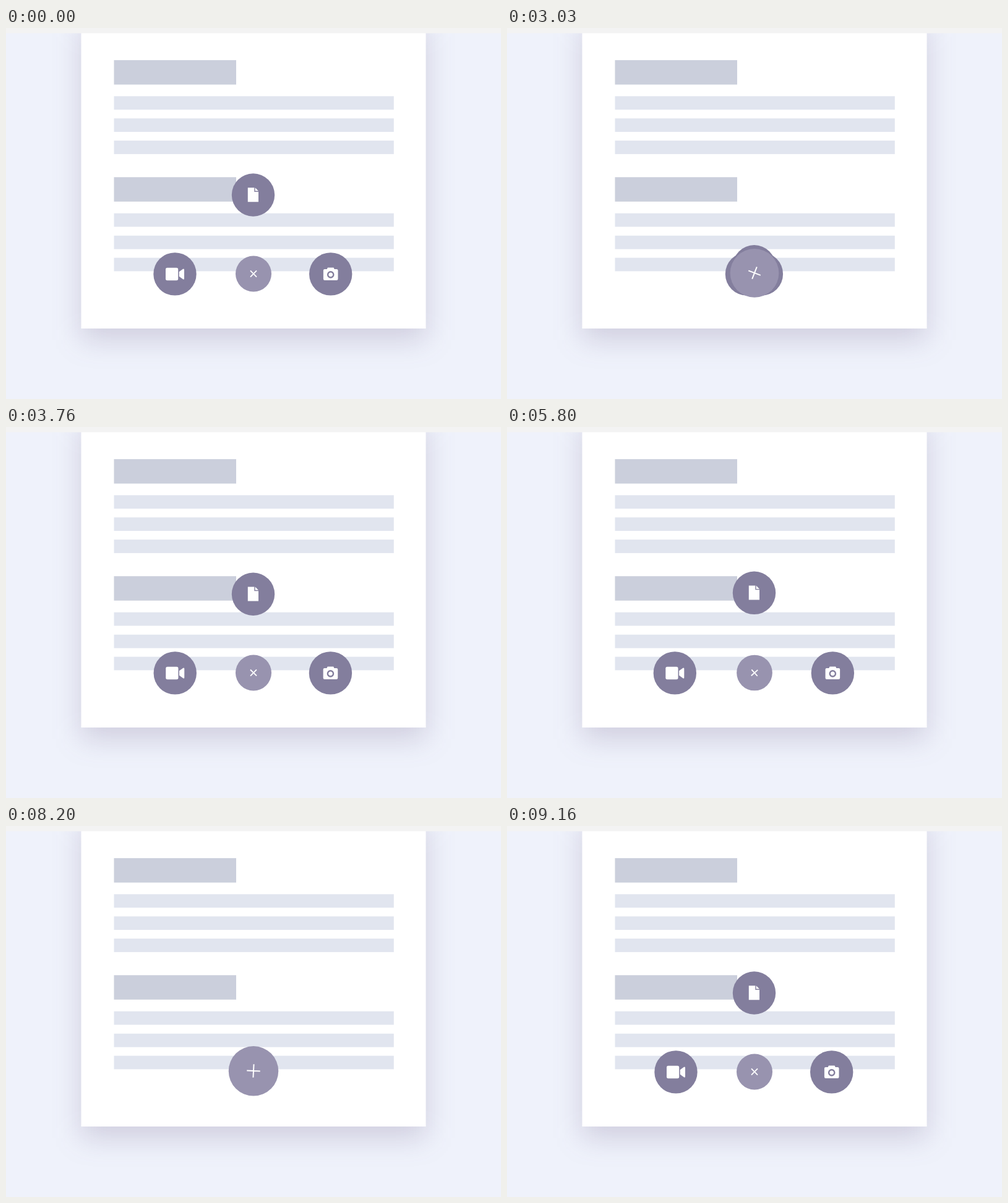
These frames come from a looping animation (800x600 px, 9.96 s). An HTML page:

```html
<!DOCTYPE html>
<html lang="en">
<head>
<meta charset="utf-8">
<title>Expanding action button</title>
<style>
  html, body { margin: 0; width: 100%; height: 100%; overflow: hidden; background: #eff2fb; }
  svg { display: block; width: 100vw; height: 100vh; }
</style>
</head>
<body>
<svg viewBox="0 0 800 600">
  <defs>
    <filter id="soft" x="-30%" y="-30%" width="160%" height="160%" color-interpolation-filters="sRGB">
      <feGaussianBlur stdDeviation="23"/>
    </filter>
  </defs>

  <rect width="800" height="600" fill="#eff2fb"/>
  <rect x="121.5" y="0" width="557" height="504" fill="rgb(80,60,110)" fill-opacity=".2" filter="url(#soft)"/>
  <rect x="121.5" y="0" width="557" height="486" fill="#fff"/>
  <rect width="800" height="8.5" fill="#f3f3f3"/>

  <path fill="#cbcfdc" d="M174.5 52h197.5v39.6h-197.5z M174.5 241.2h197.5v39.6h-197.5z"/>
  <g id="lines" fill="#e1e5ef"></g>

  <g id="video">
    <circle r="34.7" fill="#837e9d"/>
    <rect x="-15" y="-10.1" width="20.2" height="20.4" rx="2.6" fill="#fff"/>
    <path d="M6.8 -3.6L13 -8.2Q15 -9.2 15 -7V7.4Q15 9.4 13 8.4L6.8 3.8Z" fill="#fff"/>
  </g>
  <g id="photo">
    <circle r="34.7" fill="#837e9d"/>
    <path d="M-9.6 -8H-6L-4.8 -10.3H4.8L6 -8H9.6Q11.8 -8 11.8 -5.8V7.9Q11.8 10.1 9.6 10.1H-9.6Q-11.8 10.1 -11.8 7.9V-5.8Q-11.8 -8 -9.6 -8Z" fill="#fff"/>
    <circle cy="1" r="4.6" fill="none" stroke="#837e9d" stroke-width="2.4"/>
  </g>
  <g id="file">
    <circle r="34.7" fill="#837e9d"/>
    <path d="M-8.7 -11.7H1.8V-5H8.5V11.2H-8.7Z M3.2 -11.7L8.5 -6.4H3.2Z" fill="#fff"/>
  </g>

  <circle id="hub" cx="400" fill="#9893af"/>
  <path id="plus" fill="none" stroke="#fff"/>
</svg>
<script>
  const LOOP = 9960;
  const OUT = [.25, .1, .25, 1];
  const IN = [.6, -.22, .74, .3];
  const moves = [
    { at: 545, len: 315, to: 0, ease: IN },
    { at: 2944, len: 870, to: 1, ease: OUT },
    { at: 5788, len: 342, to: 0, ease: IN },
    { at: 8177, len: 970, to: 1, ease: OUT }
  ];

  const $ = id => document.getElementById(id);
  const mix = (a, b, p) => a + (b - a) * p;
  const cubic = (a, b, s) => 3 * (1 - s) * (1 - s) * s * a + 3 * (1 - s) * s * s * b + s * s * s;

  function bezier([x1, y1, x2, y2], u) {
    if (u <= 0) return 0;
    if (u >= 1) return 1;
    let lo = 0, hi = 1;
    for (let i = 0; i < 30; i++) {
      const s = (lo + hi) / 2;
      if (cubic(x1, x2, s) < u) lo = s; else hi = s;
    }
    return cubic(y1, y2, lo);
  }

  // 0 is closed, 1 is open
  function openness(t) {
    let p = 1;
    for (const m of moves) {
      if (t >= m.at) p = mix(1 - m.to, m.to, bezier(m.ease, (t - m.at) / m.len));
    }
    return p;
  }

  function place(id, x, y) {
    $(id).setAttribute("transform", `translate(${x} ${y})`);
  }

  function draw(t) {
    const p = openness(t);
    place("video", 399.5 - 126.5 * p, 397.9);
    place("photo", 399.5 + 125.2 * p, 397.9);
    place("file", 399.5, 397.9 - 127.9 * p);

    const y = mix(396.3, 397.5, p);
    $("hub").setAttribute("cy", y);
    $("hub").setAttribute("r", mix(40.4, 29, p));

    const arm = mix(10.8, 7.1, p);
    const plus = $("plus");
    plus.setAttribute("d", `M${-arm} 0H${arm}M0 ${-arm}V${arm}`);
    plus.setAttribute("stroke-width", mix(2, 1.8, p));
    plus.setAttribute("transform", `translate(400 ${y - .3 * (1 - p)}) rotate(${225 * p})`);
  }

  $("lines").innerHTML = [110.3, 146.2, 182.1, 299.7, 335.8, 371.6]
    .map(y => `<rect x="174.5" y="${y}" width="452.3" height="21.8"/>`).join("");

  const start = performance.now();
  function tick() {
    draw((performance.now() - start) % LOOP);
    requestAnimationFrame(tick);
  }
  tick();
</script>
</body>
</html>
```
